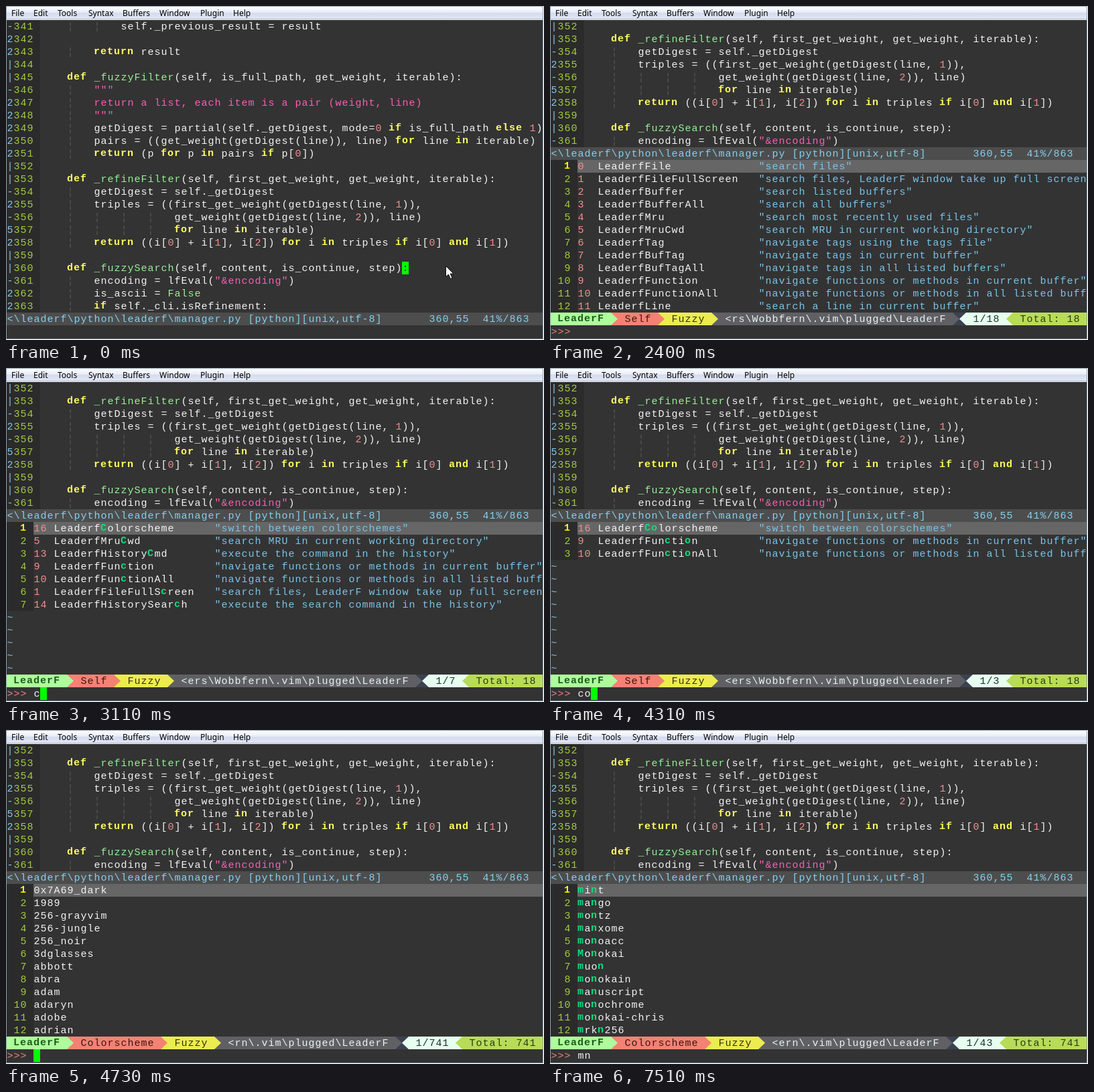
These frames come from a looping animation (803 px wide and 499 px high, 8 s). An HTML page with a canvas:

```html
<!DOCTYPE html>
<html lang="en">
<head>
<meta charset="utf-8">
<title>Fuzzy finder in an editor</title>
<style>
html, body { margin: 0; width: 100%; height: 100%; overflow: hidden; background: #fff; }
canvas { display: block; width: 803px; height: 499px; }
</style>
</head>
<body>
<canvas id="stage" width="803" height="499"></canvas>
<script>
const ctx = document.getElementById('stage').getContext('2d');
const LOOP = 8000, COLS = 80, CW = 10, RH = 19, LEFT = 1, TOP = 21;
const MONO = '15px "Liberation Mono", "Courier New", monospace';
const TRACK = 1; // widens the 9px advance to one grid column
const MENU = '12px "Noto Sans", "Open Sans", sans-serif';
const C = {
  bg: '#333333', gutter: '#2b2b2b', text: '#f4f4f4', key: '#ffff60', name: '#98f098',
  str: '#f860b4', num: '#f09090', guide: '#585858', fold: '#84c6ea', line: '#a4cc40',
  status: '#4d4d4d', statusText: '#84d0f0', select: '#666666', desc: '#7cc4ea',
  hit: '#0ce07c', cursor: '#00ff00', prompt: '#f08080'
};

const FIRST = 341;
const FOLDS = '-22||-22222||-2-52||-22';
const CODE = [
  '            self._previous_result = result',
  '',
  '        return result',
  '',
  '    def _fuzzyFilter(self, is_full_path, get_weight, iterable):',
  '        """',
  '        return a list, each item is a pair (weight, line)',
  '        """',
  '        getDigest = partial(self._getDigest, mode=0 if is_full_path else 1)',
  '        pairs = ((get_weight(getDigest(line)), line) for line in iterable)',
  '        return (p for p in pairs if p[0])',
  '',
  '    def _refineFilter(self, first_get_weight, get_weight, iterable):',
  '        getDigest = self._getDigest',
  '        triples = ((first_get_weight(getDigest(line, 1)),',
  '                    get_weight(getDigest(line, 2)), line)',
  '                    for line in iterable)',
  '        return ((i[0] + i[1], i[2]) for i in triples if i[0] and i[1])',
  '',
  '    def _fuzzySearch(self, content, is_continue, step):',
  '        encoding = lfEval("&encoding")',
  '        is_ascii = False',
  '        if self._cli.isRefinement:'
];
const DOC_FROM = 5, DOC_TO = 7;

const COMMANDS = [
  ['File', 'search files'],
  ['FileFullScreen', 'search files, LeaderF window take up full screen'],
  ['Buffer', 'search listed buffers'],
  ['BufferAll', 'search all buffers'],
  ['Mru', 'search most recently used files'],
  ['MruCwd', 'search MRU in current working directory'],
  ['Tag', 'navigate tags using the tags file'],
  ['BufTag', 'navigate tags in current buffer'],
  ['BufTagAll', 'navigate tags in all listed buffers'],
  ['Function', 'navigate functions or methods in current buffer'],
  ['FunctionAll', 'navigate functions or methods in all listed buffers'],
  ['Line', 'search a line in current buffer'],
  ['LineAll', 'search a line in all listed buffers'],
  ['HistoryCmd', 'execute the command in the history'],
  ['HistorySearch', 'execute the search command in the history'],
  ['Help', 'navigate available help tags'],
  ['Colorscheme', 'switch between colorschemes'],
  ['Self', 'execute the commands of itself']
];
const words = s => s.split(' ');
const PICKERS = {
  Self: {
    total: 18,
    found: {
      '': [18, [...Array(12).keys()]],
      c: [7, [16, 5, 13, 9, 10, 1, 14]],
      co: [3, [16, 9, 10]]
    }
  },
  Colorscheme: {
    total: 741,
    found: {
      '': [741, words('0x7A69_dark 1989 256-grayvim 256-jungle 256_noir 3dglasses abbott abra adam adaryn adobe adrian')],
      m: [158, words('mud mars maui miko mint mod8 moss muon mango mdark meta5 montz')],
      mn: [43, words('mint mango montz manxome monoacc Monokai muon monokain manuscript monochrome monokai-chris mrkn256')]
    }
  }
};
const HOME = 'C:\\Users\\Wobbfern\\.vim\\plugged\\LeaderF';

// time, view, cursor shown, typed text, query already applied
const TIMELINE = [
  [0, 'edit', 1], [840, 'edit', 0], [1120, 'edit', 1], [1520, 'edit', 0],
  [1820, 'edit', 1], [2100, 'edit', 0], [2250, 'edit', 1, ','],
  [2400, 'Self', 0, '', ''], [2520, 'Self', 1, '', ''], [2960, 'Self', 0, '', ''],
  [3110, 'Self', 1, 'c', 'c'], [3380, 'Self', 1, 'co', 'co'],
  [3840, 'Self', 0, 'co', 'co'], [4310, 'Self', 1, 'co', 'co'],
  [4610, 'edit', 1],
  [4730, 'Colorscheme', 1, '', ''], [5290, 'Colorscheme', 0, '', ''],
  [5690, 'Colorscheme', 1, '', ''], [6270, 'Colorscheme', 1, 'm', ''],
  [6400, 'Colorscheme', 1, 'm', 'm'], [6980, 'Colorscheme', 1, 'mn', 'm'],
  [7110, 'Colorscheme', 1, 'mn', 'mn'], [7510, 'Colorscheme', 0, 'mn', 'mn']
];

const colX = col => LEFT + col * CW;
const rowY = row => TOP + row * RH;

function box(col, row, cols, color) {
  ctx.fillStyle = color;
  ctx.fillRect(colX(col), rowY(row), cols * CW, RH);
}

function put(text, col, row, color, bold) {
  ctx.font = (bold ? 'bold ' : '') + MONO;
  ctx.letterSpacing = TRACK + 'px';
  ctx.fillStyle = color;
  const x = colX(col) + (bold ? 0 : TRACK / 2);
  ctx.fillText(text.slice(0, Math.max(0, COLS - col)), x, rowY(row) + (bold ? 13 : 14));
}

function polygon(points, color) {
  ctx.beginPath();
  points.forEach(([x, y]) => ctx.lineTo(x, y));
  ctx.closePath();
  ctx.fillStyle = color;
  ctx.fill();
}

function drawFrame() {
  ctx.fillStyle = '#ffffff';
  ctx.fillRect(0, 0, 803, 499);
  ctx.fillStyle = '#8aa4b4';
  ctx.fillRect(0, 0, 802, 498);
  const shade = ctx.createLinearGradient(0, 1, 0, 19);
  shade.addColorStop(0, '#ffffff');
  shade.addColorStop(0.5, '#e5eaf5');
  shade.addColorStop(0.5, '#d4dbed');
  shade.addColorStop(1, '#e1e6f6');
  ctx.fillStyle = shade;
  ctx.fillRect(1, 1, 800, 18);
  ctx.fillStyle = '#b6bccc';
  ctx.fillRect(1, 19, 800, 1);
  ctx.fillStyle = '#f0f0f0';
  ctx.fillRect(1, 20, 800, 1);
  ctx.fillStyle = C.bg;
  ctx.fillRect(1, 21, 800, 476);
  ctx.font = MENU;
  ctx.letterSpacing = '0px';
  ctx.fillStyle = '#000';
  const labels = { File: 8, Edit: 41, Tools: 77, Syntax: 123, Buffers: 174, Window: 229, Plugin: 290, Help: 339 };
  for (const label in labels) ctx.fillText(label, labels[label], 15);
}

const TOKEN = /"[^"]*"|[A-Za-z_]\w*|\d+|[^\w"]+/g;
const KEYWORDS = new Set(words('def return if else for in and'));

function drawCode(index, row) {
  const text = CODE[index], start = 5;
  box(0, row, start, C.gutter);
  put(FOLDS[index], 0, row, C.fold);
  put(String(FIRST + index), 1, row, C.line);
  const indent = text.search(/\S/);
  for (let c = 4; c < indent; c += 4) put('¦', start + c, row, C.guide);
  if (index >= DOC_FROM && index <= DOC_TO) {
    put(text.trim(), start + indent, row, C.str);
    return;
  }
  let last = '';
  for (const m of text.matchAll(TOKEN)) {
    const word = m[0];
    if (!word.trim()) continue;
    const isKey = KEYWORDS.has(word);
    const color = isKey ? C.key
      : word[0] === '"' ? C.str
      : /^\d/.test(word) ? C.num
      : last === 'def' || word === 'False' ? C.name : C.text;
    put(word, start + m.index, row, color, isKey);
    last = word;
  }
}

function drawFileStatus(row) {
  box(0, row, COLS, C.status);
  put('<\\leaderf\\python\\leaderf\\manager.py [python][unix,utf-8]', 0, row, C.statusText);
  put('360,55', 63, row, C.statusText);
  put('41%/863', 71, row, C.statusText);
}

function drawPointer(x, y) {
  const shape = [[0, 0], [0, 16], [4, 12.5], [7, 19], [9.5, 18], [6.7, 11.5], [11.5, 11.5]];
  polygon(shape.map(([a, b]) => [x + a, y + b]), '#ffffff');
  ctx.strokeStyle = '#111';
  ctx.lineWidth = 1;
  ctx.stroke();
}

function drawEditor(cursor, pending, pointer) {
  CODE.forEach((_, i) => drawCode(i, i));
  drawFileStatus(23);
  if (cursor) {
    box(59, 19, 1, C.cursor);
    put(':', 59, 19, '#222');
  }
  if (pending) put(pending, 69, 24, C.text);
  if (pointer) drawPointer(656.5, 388.5);
}

// Marks the letters of the query in order, ignoring case.
function drawMatch(text, query, col, row) {
  let next = 0;
  [...text].forEach((ch, i) => {
    const hit = next < query.length && ch.toLowerCase() === query[next];
    if (hit) next++;
    put(ch, col + i, row, hit ? C.hit : C.text, hit);
  });
}

function drawItem(item, i, query) {
  const row = 11 + i;
  box(0, row, 4, C.gutter);
  if (i === 0) box(4, row, COLS - 4, C.select);
  put(String(i + 1).padStart(3), 0, row, i ? C.line : '#ffff00', i === 0);
  if (typeof item === 'string') {
    drawMatch(item, query, 4, row);
    return;
  }
  const [name, desc] = COMMANDS[item];
  put(String(item), 4, row, C.num);
  drawMatch('Leaderf' + name, query, 7, row);
  put('"' + desc + '"', 31, row, C.desc);
}

function drawArrow(col, row, from, to, left) {
  const x = colX(col), y = rowY(row);
  box(col, row, 1, left ? from : to);
  const base = left ? x + CW : x, tip = left ? x : x + CW;
  polygon([[base, y], [tip, y + RH / 2], [base, y + RH]], left ? to : from);
}

function drawBar(mode, count, total) {
  const row = 23, dark = '#3b4252', grey = '#606064', mint = '#e6fff0', lime = '#b8dc58';
  let col = 0;
  const left = [['LeaderF', '#aefc9c', '#1d5a1d'], [mode, '#f48274', '#3c1410'], ['Fuzzy', '#ecec50', '#33330c']];
  left.forEach(([label, bg, fg], i) => {
    const width = label.length + 2;
    box(col, row, width, bg);
    put(label, col + 1, row, fg, i === 0);
    col += width;
    drawArrow(col, row, bg, i < 2 ? left[i + 1][1] : grey);
    col++;
  });

  const sum = 'Total: ' + total, rank = '1/' + count;
  const sumCol = COLS - sum.length - 2;
  const rankCol = sumCol - rank.length - 3;
  const edge = rankCol - 2;
  box(sumCol, row, sum.length + 2, lime);
  put(sum, sumCol + 1, row, '#2c3a10');
  drawArrow(sumCol - 1, row, mint, lime, true);
  box(rankCol, row, rank.length + 2, mint);
  put(rank, rankCol + 1, row, '#20302c');
  drawArrow(rankCol - 1, row, dark, mint, true);
  drawArrow(edge, row, grey, dark);

  box(col, row, edge - col, grey);
  const room = edge - col - 2;
  put('<' + HOME.slice(1 - room), col + 1, row, '#e8f4f4');
}

function drawPicker(mode, cursor, typed, query) {
  const { total, found } = PICKERS[mode];
  const [count, items] = found[query];
  for (let r = 0; r < 10; r++) drawCode(11 + r, r);
  drawFileStatus(10);
  for (let i = 0; i < 12; i++) {
    if (i < items.length) drawItem(items[i], i, query);
    else put('~', 0, 11 + i, C.fold);
  }
  drawBar(mode, count, total);
  put('>>>', 0, 24, C.prompt);
  put(typed, 4, 24, C.text);
  if (cursor) box(4 + typed.length, 24, 1, C.cursor);
}

const began = performance.now();

function tick() {
  const t = (performance.now() - began) % LOOP;
  const [, view, cursor, typed, query] = TIMELINE.findLast(step => step[0] <= t);
  drawFrame();
  if (view === 'edit') drawEditor(cursor, typed, t < 2400);
  else drawPicker(view, cursor, typed, query);
  requestAnimationFrame(tick);
}
tick();
</script>
</body>
</html>
```
